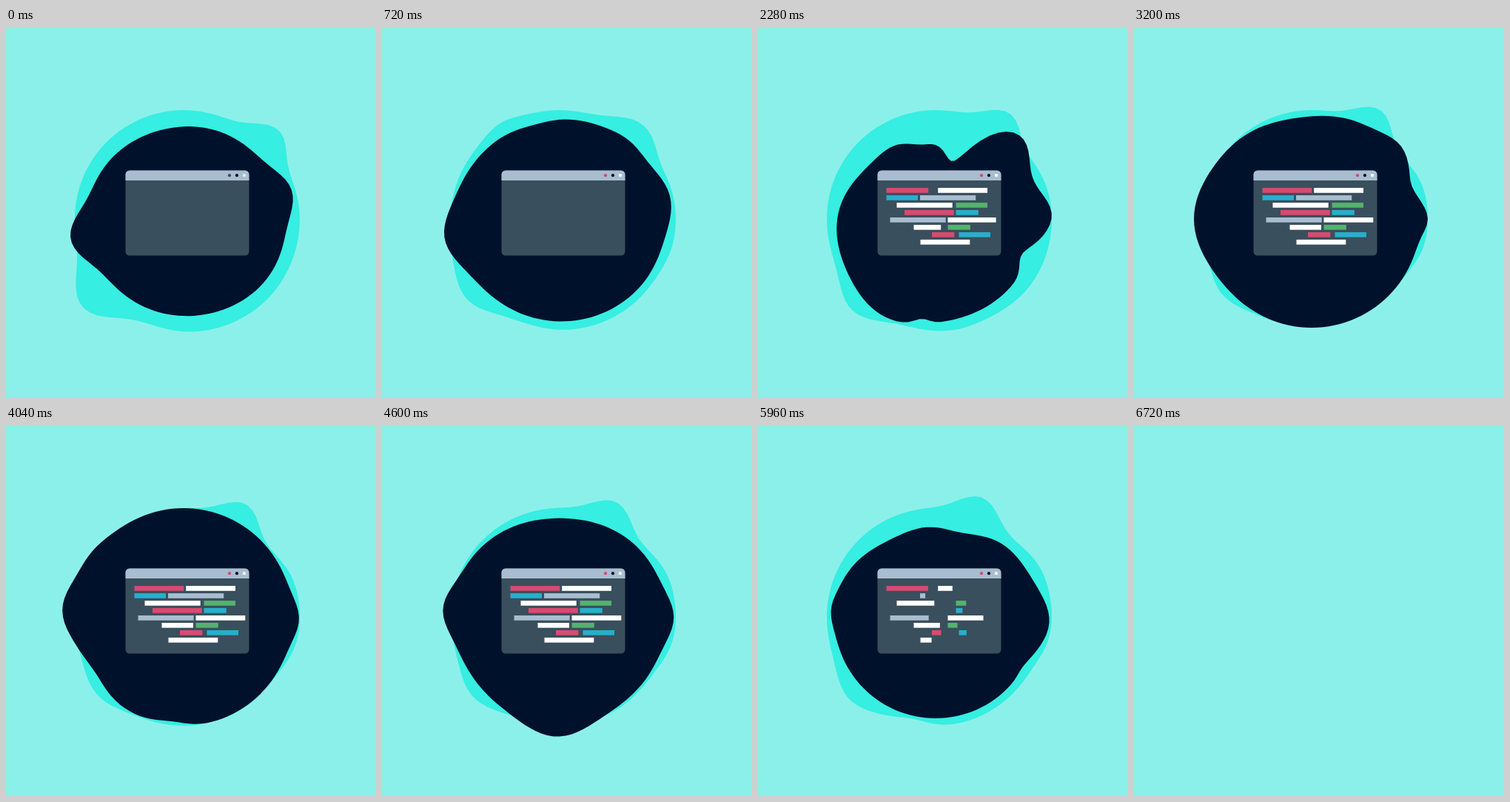
These frames come from a looping animation (500x500 px, 6.76 s). An HTML page:

```html
<!DOCTYPE html>
<html lang="en">
<head>
<meta charset="utf-8">
<title>Code window</title>
<style>
html, body { margin: 0; width: 100%; height: 100%; overflow: hidden; background: #8cf0ea; }
svg { display: block; width: 100%; height: 100%; }
</style>
</head>
<body>
<svg viewBox="0 0 500 500">
  <g id="scene">
    <path id="halo" fill="#36eee1"/>
    <path id="blob" fill="#00122b"/>
    <rect x="161.5" y="192.5" width="167" height="115" rx="5.5" fill="#3a4f5d"/>
    <path d="M161.5 206V198a5.5 5.5 0 0 1 5.5-5.5H323a5.5 5.5 0 0 1 5.5 5.5V206Z" fill="#a8bed0"/>
    <circle id="redDot" cx="302" cy="199.2" r="2.1"/>
    <circle cx="312" cy="199.2" r="2.1" fill="#00122b"/>
    <circle id="whiteDot" cx="322" cy="199.2" r="2.1"/>
    <g id="bars"></g>
  </g>
</svg>
<script>
const LOOP = 6760, FRAME = 40, END = 6720;
const CX = 240, CY = 258, STEPS = 120;
const $ = id => document.getElementById(id);
const clamp = v => Math.max(0, Math.min(1, v));
const lerp = (a, b, k) => a + (b - a) * k;
const smooth = k => k * k * (3 - 2 * k);
const linear = k => k;

// A shape maps an angle in degrees to a radius; 0 points right, 90 down.
const distance = (a, b) => Math.abs((a - b + 540) % 360 - 180);
const bump = (center, height, width, power = 2) =>
  a => height * Math.exp(-((distance(a, center) / width) ** power));
const shape = (radius, ...bumps) => a => bumps.reduce((r, f) => r + f(a), radius);
const mix = (f, g, k) => a => lerp(f(a), g(a), k);

const nose = shape(130, bump(170, 25, 16), bump(345, 17, 15), bump(25, 9, 45), bump(255, -6, 40));
const wide = shape(147, bump(175, 14, 32), bump(255, -6, 14), bump(357, 10, 14), bump(312, 8, 14));
const notch = shape(137, bump(358, 20, 14), bump(23, -12, 9), bump(118, 12, 25), bump(98, -7, 6),
  bump(225, -22, 35), bump(262, -26, 17), bump(287, -52, 14), bump(316, 24, 15));
const round = shape(147, bump(180, 12, 25), bump(262, -9, 28), bump(320, 9, 12), bump(0, 10, 9),
  bump(341, -5, 8));
const broad = shape(147, bump(184, 17, 16), bump(212, 5, 15), bump(147, -6, 14), bump(97, -5, 12),
  bump(1, 9, 12));
const dented = shape(137, bump(4, 18, 16), bump(30, -6, 8), bump(184, 11, 11), bump(240, -20, 28),
  bump(287, -29, 20));
const sagging = shape(143, bump(92, 22, 20), bump(184, 14, 14), bump(270, -12, 40), bump(0, 11, 14));
const calm = shape(137, bump(0, 16, 20), bump(255, -14, 40));

const blobKeys = [[0, nose], [1520, wide], [2280, notch], [3200, round], [4040, broad],
  [4780, sagging], [5120, dented], [END, calm]];

// The halo is a disc with a peak on top, a right shoulder and a lower left corner.
const halo = (peak, corner, cornerHeight, shoulder, shoulderWidth, ...extra) => shape(147,
  bump(peak, 27, 12.5), bump(corner, cornerHeight, 16), bump(shoulder, 10, shoulderWidth, 4), ...extra);
const haloKeys = [
  [0, halo(317, 139, 34, 15, 50, bump(80, 6, 25))],
  [1520, halo(306, 160, 8, 358, 27, bump(238, 11, 12))],
  [2280, halo(305, 132, 20, 10, 45, bump(80, 5, 25))],
  [3200, halo(302, 140, 11, 358, 27)],
  [4040, halo(299, 138, 10, 357, 29)],
  [5120, halo(294, 137, 14, 353, 30, bump(102, -6, 12))],
  [END, halo(289, 136, 14, 351, 30, bump(102, -6, 12))]
];

function shapeAt(keys, t, ease) {
  const next = Math.max(1, keys.findIndex(([time]) => time > t));
  const [t0, from] = keys[next - 1], [t1, to] = keys[next];
  return mix(from, to, ease(clamp((t - t0) / (t1 - t0))));
}

function outline(radiusAt) {
  const points = Array.from({ length: STEPS }, (_, i) => {
    const a = i * 360 / STEPS, rad = a * Math.PI / 180, r = radiusAt(a);
    return `${(CX + r * Math.cos(rad)).toFixed(2)} ${(CY + r * Math.sin(rad)).toFixed(2)}`;
  });
  return `M${points.join('L')}Z`;
}

const RED = '#d94a70', CYAN = '#28afcb', GREEN = '#53b36e', GRAY = '#a8bed0', WHITE = '#ffffff';
const S = 30.3, M = 42.5, L = 66.8, XL = 75.2;
const GROW = 800, EXIT_DELAY = 4235;
// Each line of code: bars as left edge, width, colour and start time.
const lines = [
  [[173.5, L, RED, 1600], [243.2, L, WHITE, 1160]],
  [[173.5, M, CYAN, 790], [219, XL, GRAY, 1000]],
  [[187.5, XL, WHITE, 1465], [267.5, M, GREEN, 1185]],
  [[198, L, RED, 880], [267.5, S, CYAN, 1160]],
  [[178.5, XL, GRAY, 1480], [256.5, L, WHITE, 1500]],
  [[210.5, M, WHITE, 1590], [256.5, S, GREEN, 1270]],
  [[235, S, RED, 1255], [271.5, M, CYAN, 1120]],
  [[219.5, L, WHITE, 1105]]
];
const bars = lines.flatMap((line, row) => line.map(([x, width, fill, start]) => {
  const el = document.createElementNS('http://www.w3.org/2000/svg', 'rect');
  const attrs = { x, y: 216.1 + row * 9.98, height: 6.7, fill };
  for (const name in attrs) el.setAttribute(name, attrs[name]);
  $('bars').append(el);
  return { el, start, width };
}));

const blend = (a, b, k) => `rgb(${a.map((v, i) => Math.round(lerp(v, b[i], k)))})`;

function draw(t) {
  $('scene').style.display = t < END ? '' : 'none';
  if (t >= END) return;
  $('halo').setAttribute('d', outline(shapeAt(haloKeys, t, linear)));
  $('blob').setAttribute('d', outline(shapeAt(blobKeys, t, smooth)));
  const lit = clamp(t / 500);
  $('redDot').setAttribute('fill', blend([96, 56, 88], [217, 70, 112], lit));
  $('whiteDot').setAttribute('fill', blend([214, 243, 245], [255, 255, 255], lit));
  for (const { el, start, width } of bars) {
    const shown = clamp((t - start) / GROW) - clamp((t - start - EXIT_DELAY) / GROW);
    el.setAttribute('width', (width * shown).toFixed(2));
  }
}

const began = performance.now();
function tick() {
  const t = (performance.now() - began) % LOOP;
  draw(Math.floor(t / FRAME) * FRAME);
  requestAnimationFrame(tick);
}
tick();
</script>
</body>
</html>
```
